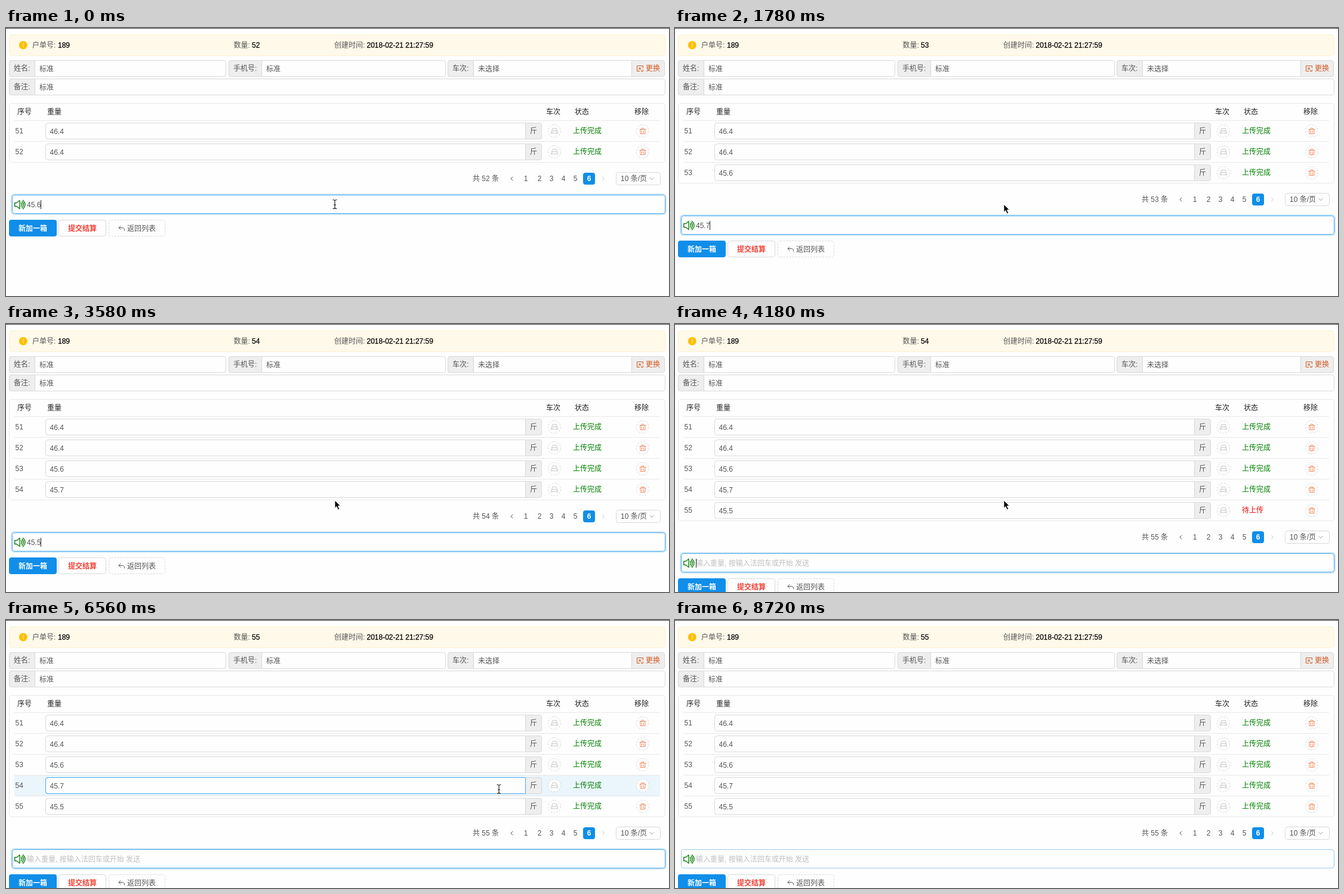
An HTML page for the animation above (8.82 s loop, 1111 px wide and 450 px high).

```html
<!DOCTYPE html>
<html lang="zh-CN">
<head>
<meta charset="utf-8">
<title>称重录入</title>
<style>
  html, body { margin: 0; width: 100%; height: 100%; overflow: hidden; background: #fefefe; }
  svg { display: block; width: 1111px; height: 450px; }
  text { font: 12px "Liberation Sans", "Noto Sans CJK SC", "Noto Sans CJK", sans-serif; fill: #555; white-space: pre; }
  .strong { fill: #000; stroke: #000; stroke-width: .25; }
  .head { fill: #222; font-weight: 500; }
  .bold { font-weight: 700; }
  .line { fill: none; stroke-linecap: round; stroke-linejoin: round; }
</style>
</head>
<body>
<svg id="stage" viewBox="0 0 1111 450"></svg>
<script>
const LOOP = 8820, ROW = 35, BLUE = '#108ee9', GREY = '#d9d9d9';
const stage = document.getElementById('stage');

const text = (x, y, s, attrs = '') => `<text x="${x}" y="${y}" ${attrs}>${s}</text>`;
const path = (d, color, attrs = '') => `<path class="line" d="${d}" stroke="${color}" ${attrs}/>`;
// Outer edges of a box with a one pixel border
const box = (x1, y1, x2, y2, attrs = '', r = 4) =>
  `<rect x="${x1 + .5}" y="${y1 + .5}" width="${x2 - x1 - 1}" height="${y2 - y1 - 1}" rx="${r}" fill="#fefefe" stroke="${GREY}" ${attrs}/>`;
const rule = (y, attrs = '') => `<rect x="14" y="${y}" width="1082" height="1" fill="#e9e9e9" ${attrs}/>`;

const leftAddon = (x, y, x2) =>
  `<path d="M${x2 - .5} ${y + .5}H${x + 4}q-3.5 0-3.5 3.5v20q0 3.5 3.5 3.5H${x2 - .5}z" fill="#eee" stroke="${GREY}"/>`;
const rightAddon = (x, y, x2) =>
  `<path d="M${x + .5} ${y + .5}H${x2 - 4}q3.5 0 3.5 3.5v20q0 3.5-3.5 3.5H${x + .5}z" fill="#eee" stroke="${GREY}"/>`;

function field(x, y, x2, split, label, value) {
  return box(x, y, x2, y + 28) + leftAddon(x, y, split) +
    text(x + 8, y + 18, label) + text(split + 7, y + 19, value);
}

function header() {
  return '<rect width="1111" height="1" fill="#3c3c3c"/>' +
    box(5, 11, 1105, 47, 'style="fill:#fff9e9;stroke:#fff0cc"') +
    '<circle cx="28.8" cy="28.8" r="7" fill="#ffbf00"/>' +
    path('M28.8 25v5M28.8 32.4v.2', '#fff0bf', 'stroke-width="1.2"') +
    text(44, 33, '户单号:') + text(87, 33, '189', 'class="strong"') +
    text(381.5, 33, '数量:') + text(412, 33, '', 'class="strong" id="count"') +
    text(550, 33, '创建时间:') + text(604.5, 33, '2018-02-21 21:27:59', 'class="strong"') +
    field(5, 54, 369, 49, '姓名:', '标准') +
    field(373, 54, 737, 429, '手机号:', '标准') +
    field(740, 54, 1104, 784, '车次:', '未选择') +
    rightAddon(1048, 54, 1104) +
    path('M1067.5 67v-3.5h-10v9h4M1064.5 72.5h3v-2M1061 67l4 4M1061 70v-3h3', '#d4571f') +
    text(1072, 72, '更换', 'style="fill:#d4571f"') +
    field(5, 85, 1105, 49, '备注:', '标准') +
    box(5, 126, 1105, 226, 'id="card" style="stroke:#e9e9e9"') +
    [[19, '序号'], [69, '重量'], [905, '车次'], [953, '状态'], [1053, '移除']]
      .map(([x, s]) => text(x, 145, s, 'class="head"')).join('') +
    rule(155);
}

function tableRow(weight, i) {
  const y = 156 + ROW * i, mid = y + 17;
  const ring = x => `<circle cx="${x}" cy="${mid}" r="10.5" fill="#fefefe" stroke="${GREY}" stroke-dasharray="3 2"/>`;
  return `<g class="row">` +
    (i ? rule(y - 1) : '') +
    `<rect class="hover" x="14" y="${y}" width="1082" height="34" fill="#eaf5fc" opacity="0"/>` +
    text(15.5, y + 21, 51 + i) +
    box(66, y + 3, 898, y + 31) + rightAddon(870, y + 3, 898) +
    `<path class="focus" d="M870.5 ${y + 3.5}H70q-3.5 0-3.5 3.5v20q0 3.5 3.5 3.5H870.5z" fill="none" stroke="#49a9ee" opacity="0"/>` +
    text(73.5, y + 22, weight) + text(878, y + 21, '斤') +
    ring(919) + ring(1067) +
    `<g transform="translate(919 ${mid})">` +
    path('M-4.5-.5l1.3-4h6.4l1.3 4M-5.5 3v-2.5l1-1h9l1 1v2.5zM-4.5 3v1.5M4.5 3v1.5M-3.5 1.2h1M2.5 1.2h1', '#cbcbcb') + '</g>' +
    `<g transform="translate(1067 ${mid})">` +
    path('M-5-2.5h10M-2-2.7v-2h4v2M-4-2.3v7h8v-7M-1.5 0v3M1.5 0v3', '#f08a5c') + '</g>' +
    text(950, y + 21, '', 'class="status"') + '</g>';
}

function footer() {
  const pages = [871, 894, 914, 934, 954];
  return text(782, 257, '', 'id="total"') +
    path('M849 250l-3 3 3 3', '#555') + path('M999.5 250l3 3-3 3', '#c4c4c4') +
    pages.map((x, i) => text(x, 257, i + 1, 'text-anchor="middle"')).join('') +
    `<rect x="967" y="243" width="20" height="20" rx="4" fill="${BLUE}"/>` +
    text(977, 257, 6, 'text-anchor="middle" class="bold" style="fill:#fff"') +
    box(1022, 242, 1097, 264) + text(1030, 257, '10 条/页') +
    path('M1079 251.5l3 3 3-3', '#999') +
    `<rect id="glow" x="9" y="279" width="1097" height="34" rx="5" fill="none" stroke="${BLUE}" stroke-opacity=".22" stroke-width="2"/>` +
    box(10, 280, 1105, 312, 'id="entry"') +
    path('M14.7 293.5v6h3.3l5 4v-14l-5 4zM25.5 293.5q2 3 0 6M27 291.2q4.5 5.3 0 10.6M28.5 289.2q7 7.3 0 14.6', '#118011', 'stroke-width="1.4"') +
    text(35, 301, '输入重量, 按输入法回车或开始 发送', 'id="hint" style="fill:#bfbfbf"') +
    text(35, 301, '', 'id="typed"') +
    '<rect id="caret" y="289" width="1" height="15" fill="#222"/>' +
    `<rect x="5" y="322" width="80" height="28" rx="4" fill="${BLUE}"/>` +
    text(21, 341, '新加一箱', 'class="bold" style="fill:#fff"') +
    box(88, 322, 168, 350) + text(104, 341, '提交结算', 'class="bold" style="fill:#f04134"') +
    box(172, 322, 267, 350, 'stroke-dasharray="3 2"') +
    path('M192 332.5l-3 3 3 3M189.3 335.5h6q3.2 0 3.2 4.5', '#555') +
    text(203, 341, '返回列表');
}

const pointers =
  '<g id="beam">' +
  path('M-3-7.5q2.5 0 3 1.5q.5-1.5 3-1.5M0-6V6M-3 7.5q2.5 0 3-1.5q.5 1.5 3 1.5M-1.5 1h3', '#fff', 'stroke-width="2.6"') +
  path('M-3-7.5q2.5 0 3 1.5q.5-1.5 3-1.5M0-6V6M-3 7.5q2.5 0 3-1.5q.5 1.5 3 1.5M-1.5 1h3', '#111', 'stroke-width="1.1"') + '</g>' +
  '<path id="arrow" d="M0 0V13.2L3-.2V10.4L3 10.4L5.4 15.6L7.8 14.6L5.5 9.5H9.6z" fill="#000" stroke="#fff" stroke-width="1"/>';

const weights = ['46.4', '46.4', '45.6', '45.7', '45.5'];
stage.innerHTML = header() + weights.map(tableRow).join('') + `<g id="footer">${footer()}</g>` + pointers;
const el = id => document.getElementById(id);
el('arrow').setAttribute('d', 'M0 0V13.4L3 10.5L5.4 15.8L7.8 14.7L5.5 9.6H9.6z');
const rows = [...stage.querySelectorAll('.row')].map(g => ({
  g, hover: g.querySelector('.hover'), focus: g.querySelector('.focus'), status: g.querySelector('.status')
}));

// Each track lists [start, value]; values hold until the next start
const tracks = {
  added: [[0, 2], [450, 3], [2230, 4], [4180, 5]],
  uploaded: [[0, 2], [750, 3], [2530, 4], [4330, 5]],
  typed: [[0, '45.6'], [450, ''], [890, '4'], [1040, '45'], [1330, '45.'], [1780, '45.7'], [2230, ''],
    [2680, '4'], [2830, '45'], [3130, '45.'], [3580, '45.5'], [4180, '']],
  caret: [[0, 1], [4470, 0], [4920, 1], [5520, 0], [6110, 1], [6560, 0], [7010, 1], [7600, 0], [7900, 1], [8500, 0]],
  hover: [[0, 0], [4330, .5], [4470, 1], [7010, .5], [7150, .2], [7300, 0]],
  focus: [[0, 0], [5810, .5], [5960, 1], [7450, .4], [7600, 0]],
  glow: [[0, 1], [8500, .5], [8720, 0]],
  pointer: [[0, 'beam'], [600, 'arrow'], [5810, 'beam'], [7010, 'arrow'], [7300, 'beam'], [7600, '']],
  place: [[0, [551, 296]], [5810, [560, 289]], [5960, [602, 283]], [6110, [664, 280]], [6260, [732, 279]],
    [6410, [790, 280]], [6560, [826, 284]], [7010, [828, 302]], [7150, [828, 350]], [7300, [828, 391]], [7450, [828, 409]]]
};
const at = (name, t) => tracks[name].findLast(([start]) => start <= t)[1];
const show = (node, on) => node.setAttribute('visibility', on ? 'visible' : 'hidden');

function render(t) {
  const added = at('added', t), uploaded = at('uploaded', t), typed = at('typed', t);
  const shift = ROW * (added - 2);
  rows.forEach((row, i) => {
    const done = i < uploaded;
    show(row.g, i < added);
    row.status.textContent = done ? '上传完成' : '待上传';
    row.status.style.fill = done ? '#008000' : '#f00';
  });
  rows[3].hover.setAttribute('opacity', at('hover', t));
  rows[3].focus.setAttribute('opacity', at('focus', t));

  el('count').textContent = 50 + uploaded;
  el('total').textContent = `共 ${50 + added} 条`;
  el('card').setAttribute('height', 99 + shift);
  el('footer').setAttribute('transform', `translate(0 ${shift})`);

  const glow = at('glow', t);
  el('glow').setAttribute('opacity', glow);
  el('entry').style.stroke = glow ? '#49a9ee' : '#9cc9ea';
  el('typed').textContent = typed;
  show(el('hint'), !typed);
  show(el('caret'), at('caret', t));
  el('caret').setAttribute('x', Math.floor(35 + (typed ? el('typed').getComputedTextLength() : 0)));

  const pointer = at('pointer', t);
  for (const id of ['beam', 'arrow']) {
    show(el(id), pointer === id);
    el(id).setAttribute('transform', `translate(${at('place', t)})`);
  }
}

const start = performance.now();
function tick() {
  render((performance.now() - start) % LOOP);
  requestAnimationFrame(tick);
}
tick();
</script>
</body>
</html>
```
